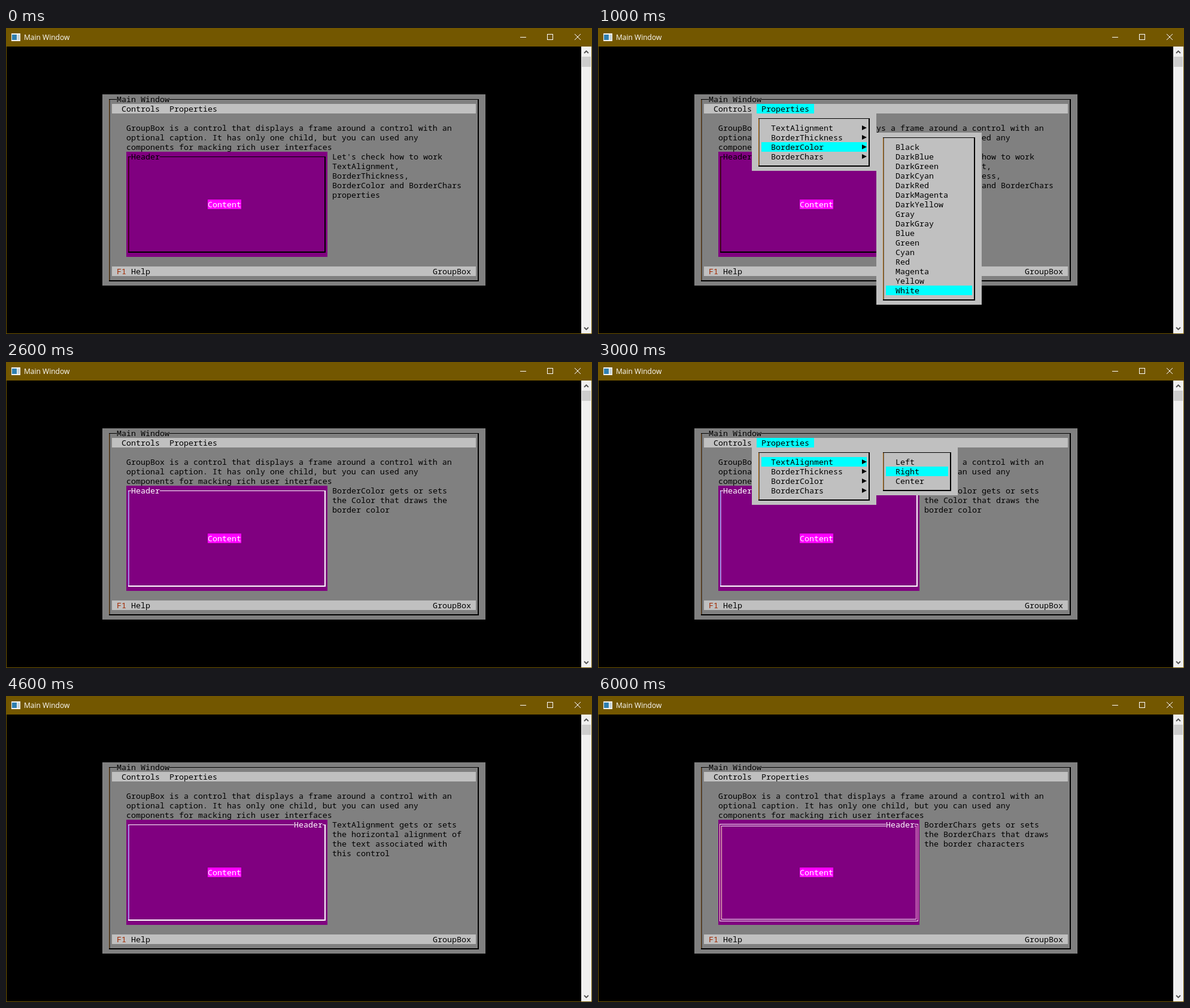
An HTML page for the animation above (7 s loop, 979x512 px).

```html
<!DOCTYPE html>
<html lang="en">
<head>
<meta charset="utf-8">
<title>Main Window</title>
<style>
  html, body { margin: 0; width: 100%; height: 100%; overflow: hidden; background: #000; }
  svg { display: block; width: 979px; height: 512px; shape-rendering: crispEdges; }
  text { font: 13.333px "Noto Sans Mono", "DejaVu Sans Mono", monospace; white-space: pre; }
  .title { font: 12px "Open Sans", "Noto Sans", sans-serif; }
  .smooth { shape-rendering: auto; }
</style>
</head>
<body>
<svg id="stage" viewBox="0 0 979 512"></svg>
<script>
const GRAY = '#808080', SILVER = '#c0c0c0', CYAN = '#00ffff', PURPLE = '#800080';
const ROW = 16, STEP = 1000;

const rect = (x, y, w, h, fill) =>
  `<rect x="${x}" y="${y}" width="${w}" height="${h}" fill="${fill}"/>`;
const text = (x, y, str, fill = '#000') =>
  `<text x="${x}" y="${y + 12.5}" fill="${fill}">${str}</text>`;
const lines = (x, y, list) => list.map((s, i) => text(x, y + i * ROW, s)).join('');
const stroke = (d, color, width = 1, cls = '') =>
  `<path d="${d}" fill="none" stroke="${color}" stroke-width="${width}" class="${cls}"/>`;

// Character-cell border: light top and left, heavy right and bottom.
function frame(x, y, w, h, color, edge) {
  const l = x + 3, t = y + 8, r = x + w - 5, b = y + h - 9;
  return rect(l, t, 1, b - t + 2, edge) +
    `<g opacity=".5">${rect(l + 1, t, 1, b - t, color)}</g>` +
    rect(l, t, r - l + 2, 1, color) +
    rect(r, t, 2, b - t + 2, color) +
    rect(l, b, r - l + 2, 2, color);
}

function doubleFrame(x, y, w, h) {
  const ring = (l, t, r, b) =>
    rect(l, t, 1, b - t, '#ffe0c0') + rect(r, t, 1, b - t, '#ffc8e0') +
    rect(l, t, r - l + 1, 1, '#fff') + rect(l, b, r - l + 1, 1, '#fff');
  return ring(x + 2, y + 7, x + w - 3, y + h - 7) +
    ring(x + 5, y + 10, x + w - 6, y + h - 10);
}

const panel = (x, y, w, h, fill, edge) =>
  rect(x, y, w, h, fill) + frame(x + 8, y, w - 16, h, '#000', edge);

function menu(x, y, w, items, active) {
  const h = (items.length + 2) * ROW;
  return panel(x, y, w, h, SILVER, '#a86000') +
    rect(x + 16, y + ROW * (active + 1), w - 32, ROW, CYAN) +
    items.map((item, i) => {
      const top = y + ROW * (i + 1);
      return typeof item === 'string' ? text(x + 32, top, item) : item(x + 32, top);
    }).join('');
}

const arrow = (x, y) =>
  `<path class="smooth" d="M${x} ${y + 4}l8 4l-8 4z" fill="#000"/>`;

const properties = ['TextAlignment', 'BorderThickness', 'BorderColor', 'BorderChars'];
const dropdown = active =>
  rect(265, 127, 96, ROW, CYAN) + text(273, 127, 'Properties') +
  menu(257, 143, 208, properties, active) +
  properties.map((_, i) => arrow(441, 159 + i * ROW)).join('');

// Previews of the border character sets.
const cap = (x, y, inset = 0) =>
  `M${x + 3.5 + inset} ${y + 16}V${y + 8.5 + inset}H${x + 20.5 - inset}V${y + 16}`;
const cup = (x, y, inset = 0) =>
  `M${x + 35.5 + inset} ${y}V${y + 8.5 - inset}H${x + 52.5 - inset}V${y}`;
const charSets = [
  (x, y) => stroke(cap(x, y) + cup(x, y), '#000') +
    rect(x + 19, y + 8, 2, 8, '#000') + rect(x + 35, y + 7, 18, 2, '#000') +
    rect(x + 51, y, 2, 9, '#000'),
  (x, y) => stroke(cap(x, y, -1) + cap(x, y, 2) + cup(x, y, -1) + cup(x, y, 2), '#000'),
  (x, y) => stroke(cap(x, y) + cup(x, y), '#000')
];

const colors = ['Black', 'DarkBlue', 'DarkGreen', 'DarkCyan', 'DarkRed', 'DarkMagenta',
  'DarkYellow', 'Gray', 'DarkGray', 'Blue', 'Green', 'Cyan', 'Red', 'Magenta',
  'Yellow', 'White'];

const chrome = () =>
  rect(0, 0, 979, 512, '#735700') + rect(1, 31, 960, 480, '#000') +
  rect(9, 9, 15, 13, '#f4f4f4') + rect(10, 11, 8, 9, '#2f7fb0') +
  rect(19, 11, 4, 9, '#c8d4d8') +
  '<text class="title" x="30" y="20" fill="#fff">Main Window</text>' +
  rect(859, 15, 10, 1, '#fff') + stroke('M904.5 10.5h9v9h-9z', '#fff') +
  stroke('M950 10l10 10M960 10l-10 10', '#fff', 1, 'smooth') +
  rect(961, 31, 17, 480, '#f0f0f0') + rect(962, 48, 15, 17, '#cdcdcd') +
  stroke('M966 42l3.5-3.5l3.5 3.5M966 501l3.5 3.5l3.5-3.5', '#505050', 1.8, 'smooth');

const dialog = () =>
  panel(161, 111, 640, 320, GRAY, '#6c4210') +
  rect(185, 111, 88, ROW, GRAY) + text(185, 111, 'Main Window') +
  rect(177, 127, 608, ROW, SILVER) + text(193, 127, 'Controls') + text(273, 127, 'Properties') +
  lines(201, 159, [
    'GroupBox is a control that displays a frame around a control with an',
    'optional caption. It has only one child, but you can used any',
    'components for macking rich user interfaces'
  ]) +
  rect(177, 399, 608, ROW, SILVER) + text(185, 399, 'F1', '#a02800') +
  text(209, 399, 'Help') + text(713, 399, 'GroupBox');

function groupBox({ white, right, double }) {
  const box = [201, 207, 336, 176], color = white ? '#fff' : '#000';
  const x = right ? 481 : 209;
  return rect(...box, PURPLE) +
    (double ? doubleFrame(...box) : frame(...box, color, white ? '#9090ff' : '#400000')) +
    rect(x, 207, 48, ROW, PURPLE) + text(x, 207, 'Header', color) +
    rect(337, 287, 56, ROW, '#ff00ff') + text(337, 287, 'Content', '#fff');
}

const notes = {
  intro: ["Let's check how to work", 'TextAlignment,', 'BorderThickness,',
    'BorderColor and BorderChars', 'properties'],
  color: ['BorderColor gets or sets', 'the Color that draws the', 'border color'],
  align: ['TextAlignment gets or sets', 'the horizontal alignment of',
    'the text associated with', 'this control'],
  chars: ['BorderChars gets or sets', 'the BorderChars that draws', 'the border characters']
};

const plain = {}, white = { white: true }, right = { white: true, right: true };
const scenes = [
  { box: plain, note: 'intro' },
  { box: plain, note: 'intro', active: 2, sub: [465, 175, 176, colors, 15] },
  { box: white, note: 'color' },
  { box: white, note: 'color', active: 0, sub: [465, 143, 136, ['Left', 'Right', 'Center'], 1] },
  { box: right, note: 'align' },
  { box: right, note: 'align', active: 3, sub: [465, 191, 144, charSets, 1] },
  { box: { ...right, double: true }, note: 'chars' }
];

const stage = document.getElementById('stage');
stage.innerHTML = chrome() + dialog() + scenes.map(s =>
  `<g class="scene">${groupBox(s.box)}${lines(545, 207, notes[s.note])}` +
  (s.sub ? dropdown(s.active) + menu(...s.sub) : '') + '</g>').join('');

const groups = [...stage.querySelectorAll('.scene')];
let shown = -1;
function tick() {
  const now = Math.floor(performance.now() / STEP) % scenes.length;
  if (now !== shown) {
    groups.forEach((g, i) => g.style.display = i === now ? '' : 'none');
    shown = now;
  }
  requestAnimationFrame(tick);
}
tick();
</script>
</body>
</html>
```
